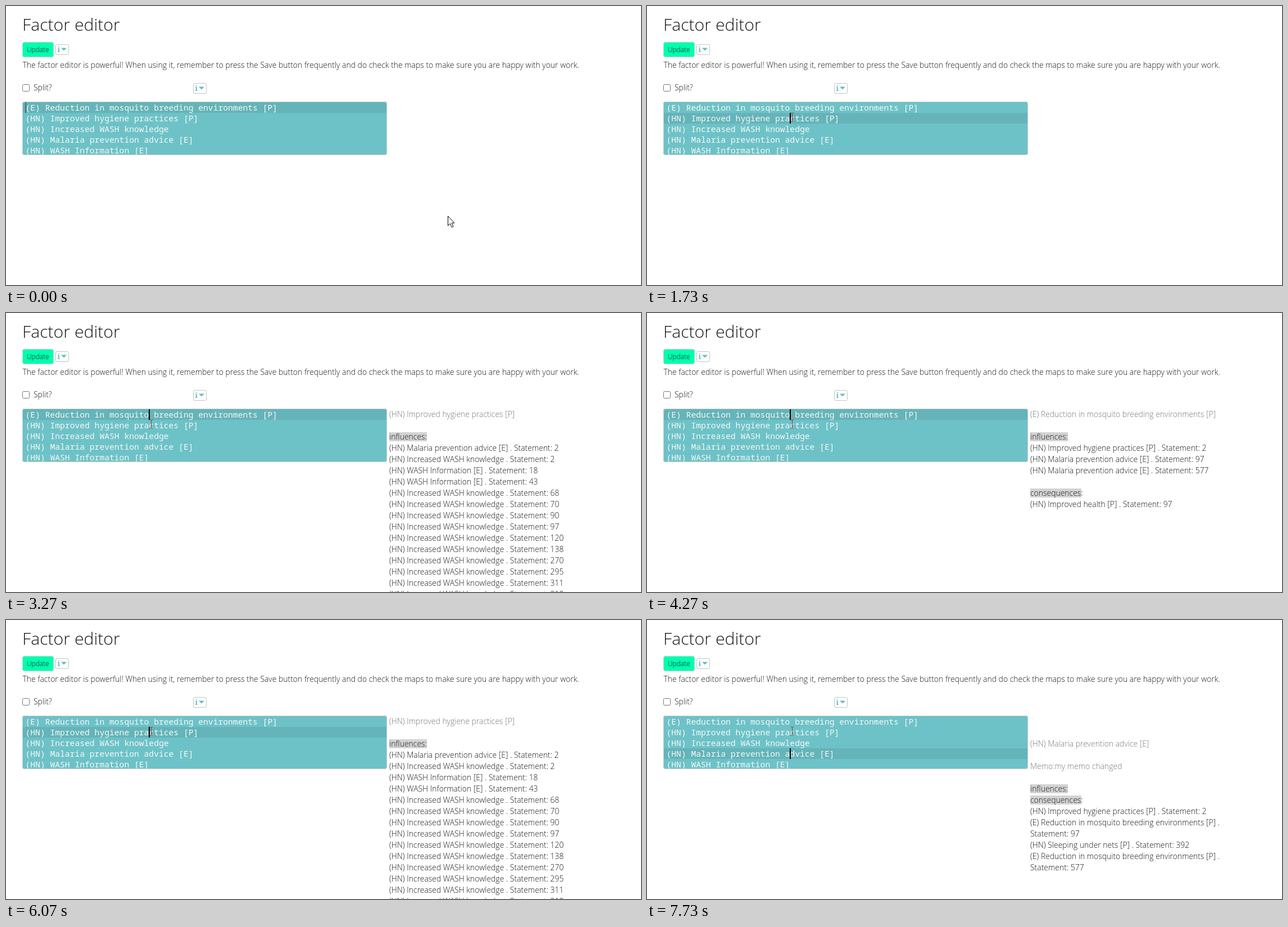
Animation of 1130x496 px, one loop 8000 ms. Source, as an HTML page:

```html
<!DOCTYPE html>
<html lang="en">
<head>
<meta charset="utf-8">
<title>Factor editor</title>
<style>
  html, body { margin: 0; width: 100%; height: 100%; overflow: hidden; background: #fff; }
  svg { display: block; width: 1130px; height: 496px; }
  text { font: 300 13.94px "Open Sans", sans-serif; fill: #16181b; white-space: pre; }
  .title { font-size: 30.2px; }
  .small { font-size: 11.9px; }
  .muted { fill: #777; }
  .code text { font: 400 14.66px "Noto Sans Mono", monospace; fill: #f8f8f2; }
  .icon { font: 700 13px "Noto Serif", serif; fill: #5fbfc4; }
  .box { fill: #fff; stroke: #c4c4c4; }
</style>
</head>
<body>
<svg viewBox="0 0 1130 496">
  <defs>
    <clipPath id="inside"><rect x="29" y="170" width="649" height="95" rx="4"/></clipPath>
    <g id="info">
      <rect class="box" x=".5" y=".5" width="23" height="18" rx="2.5"/>
      <text class="icon" x="3.5" y="14">i</text>
      <path d="M10 6.5h10l-5 5z" fill="#5fbfc4"/>
    </g>
  </defs>

  <text class="title" x="29" y="44">Factor editor</text>
  <rect x="29.5" y="64.5" width="55" height="26" rx="3" fill="#00ffaf" stroke="#b5d9cb"/>
  <text class="small" x="37" y="82">Update</text>
  <use href="#info" x="88" y="68"/>
  <text x="29.5" y="110">The factor editor is powerful! When using it, remember to press the Save button frequently and do check the maps to make sure you are happy with your work.</text>
  <rect x="29.5" y="139.5" width="12" height="12" rx="2" fill="#fff" stroke="#767676"/>
  <text x="49" y="150">Split?</text>
  <use href="#info" x="333" y="137"/>

  <g clip-path="url(#inside)">
    <rect x="29" y="170" width="649" height="95" fill="#6dc2c8"/>
    <rect id="active" x="30" width="647" height="19" fill="#64b4b9"/>
    <g id="code" class="code"></g>
    <rect id="caret" width="2" height="19"/>
  </g>
  <rect x="29.5" y="170.5" width="648" height="94" rx="4" fill="none" stroke="#c4cccc"/>

  <g id="panel"></g>
  <path id="arrow" d="M.5 .5V17.5L4.5 13.8L7.2 20.3L10 19L7.2 12.8H12z" fill="#fff" stroke="#000"/>
  <path id="beam" d="M-3 -7.5H-1L0 -6.5L1 -7.5H3M0 -6.5V6.5M-3 7.5H-1L0 6.5L1 7.5H3" fill="none" stroke="#8f3d37"/>
</svg>
<script>
const DURATION = 8000;
const $ = id => document.getElementById(id);

const REDUCTION = '(E) Reduction in mosquito breeding environments [P]';
const HYGIENE = '(HN) Improved hygiene practices [P]';
const KNOWLEDGE = '(HN) Increased WASH knowledge';
const ADVICE = '(HN) Malaria prevention advice [E]';
const INFORMATION = '(HN) WASH Information [E]';
const AGENCY = '(IEA) Government HSA';
const factors = [REDUCTION, HYGIENE, KNOWLEDGE, ADVICE, INFORMATION];

const statements = (factor, ...ids) => ids.map(id => `${factor} . Statement: ${id}`);
const muted = text => ({ text, muted: true });
const label = (text, width) => ({ text, width });
const influences = label('influences:', 67);
const consequences = label('consequences:', 91);

const panels = [
  [],
  [muted(HYGIENE), '', influences,
    ...statements(ADVICE, 2), ...statements(KNOWLEDGE, 2), ...statements(INFORMATION, 18, 43),
    ...statements(KNOWLEDGE, 68, 70, 90, 97, 120, 138, 270, 295, 311, 318)],
  [muted(REDUCTION), '', influences,
    ...statements(HYGIENE, 2), ...statements(ADVICE, 97, 577),
    '', consequences, ...statements('(HN) Improved health [P]', 97)],
  ['', muted(KNOWLEDGE), '', influences,
    ...statements(INFORMATION, 2, 49, 68), ...statements(AGENCY, 70),
    ...statements(INFORMATION, 90, 97, 120), ...statements(AGENCY, 120),
    ...statements(INFORMATION, 138, 270), ...statements(AGENCY, 295, 311),
    ...statements(INFORMATION, 318)],
  ['', '', muted(ADVICE), '', muted('Memo:my memo changed'), '', influences, consequences,
    ...statements(HYGIENE, 2), REDUCTION + ' .', 'Statement: 97',
    ...statements('(HN) Sleeping under nets [P]', 392), REDUCTION + ' .', 'Statement: 577'],
];

// Each entry is [start time, value].
const rowTimes = [[0, 0], [1730, 1], [3270, 0], [5800, 1], [6670, 2], [7530, 3]];
const panelTimes = [[0, 0], [1930, 1], [3470, 2], [6070, 1], [6870, 3], [7730, 4]];
const caretOff = [[2330, 2730], [3870, 4270], [4870, 5270], [6400, 6670], [7200, 7530]];
const beamTimes = [[0, [260.5, 196.5]], [930, [259.5, 197.5]], [1270, [258.5, 198.5]], [1400, [258.5, 197.5]]];

const valueAt = (steps, t) => steps.findLast(([start]) => t >= start)[1];

function add(parent, tag, attributes, text = '') {
  const node = document.createElementNS('http://www.w3.org/2000/svg', tag);
  for (const name in attributes) node.setAttribute(name, attributes[name]);
  node.textContent = text;
  return parent.appendChild(node);
}

factors.forEach((text, i) => add($('code'), 'text', { x: 34.5, y: 186 + 19 * i }, text));

const panelNodes = panels.map(lines => {
  const group = add($('panel'), 'g', {});
  lines.forEach((line, i) => {
    const y = 185 + 20 * i;
    if (line.width) add(group, 'rect', { x: 682, y: y - 13, width: line.width, height: 16, fill: '#d3d3d3' });
    add(group, 'text', { x: 682, y, class: line.muted ? 'muted' : '' }, line.text ?? line);
  });
  return group;
});

function pointerAt(t) {
  if (t >= 730) return valueAt(beamTimes, t);
  const step = t < 70 ? 0 : Math.floor((t - 70) / 66) + 1;
  const p = step / 11, eased = p * p * (3 - 2 * p);
  return [Math.round(786 - 526 * eased), Math.round(373 - 177 * eased)];
}

function draw() {
  const t = performance.now() % DURATION;
  const y = 171 + 19 * valueAt(rowTimes, t);
  $('active').setAttribute('y', y);

  const focused = t >= 1730;
  const hidden = caretOff.some(([from, to]) => t >= from && t < to);
  $('caret').setAttribute('x', focused ? 254 : 34);
  $('caret').setAttribute('y', y);
  $('caret').setAttribute('opacity', hidden ? 0 : focused ? 1 : 0.35);

  const shown = valueAt(panelTimes, t);
  panelNodes.forEach((node, i) => node.setAttribute('display', i === shown ? 'inline' : 'none'));

  const [px, py] = pointerAt(t);
  const overEditor = px < 678 && py < 265;
  for (const id of ['arrow', 'beam']) {
    $(id).setAttribute('transform', `translate(${px} ${py})`);
    $(id).setAttribute('display', (id === 'beam') === overEditor ? 'inline' : 'none');
  }
  requestAnimationFrame(draw);
}
draw();
</script>
</body>
</html>
```
